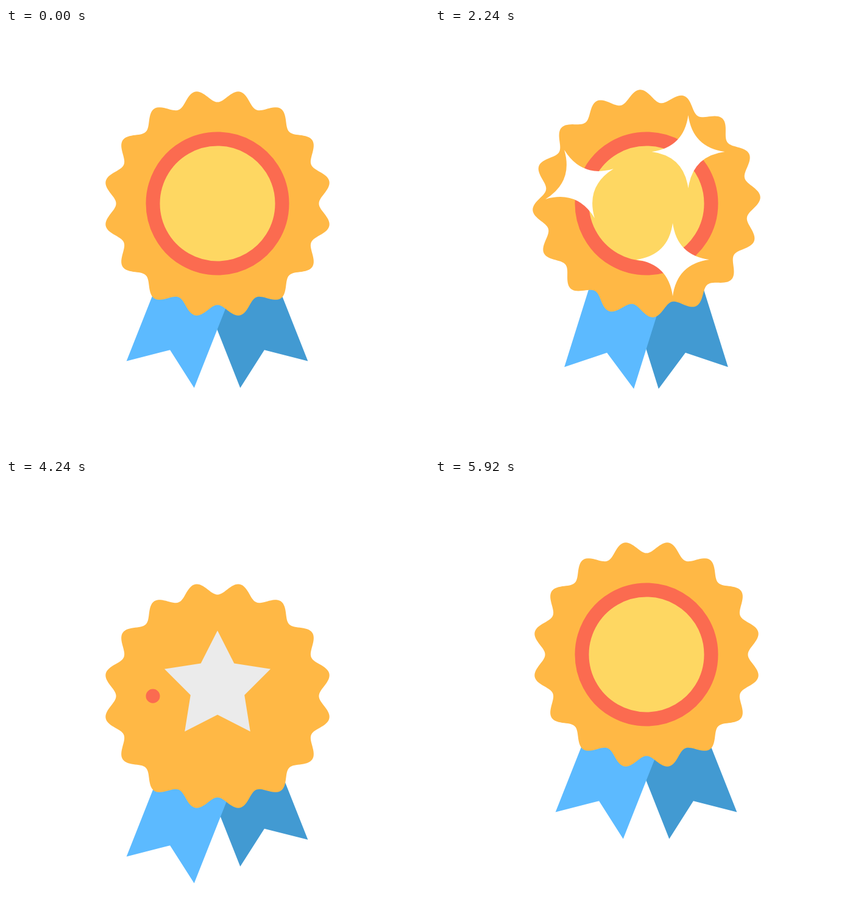
Write an HTML page that moves like this. It is 694 px wide and 694 px high and loops after 6 s.

```html
<!DOCTYPE html>
<html lang="en">
<head>
<meta charset="utf-8">
<title>Award rosette</title>
<style>
  html, body { margin: 0; width: 100%; height: 100%; overflow: hidden; background: #fff; }
  svg { display: block; width: 100%; height: 100%; }
</style>
</head>
<body>
<svg viewBox="0 0 694 694">
  <path id="darkRibbon" fill="#429ad2"/>
  <path id="lightRibbon" fill="#5cbaff"/>
  <path id="badge" fill="#ffb845"/>
  <g id="medal">
    <circle id="disc" r="106" fill="#fed762"/>
    <path id="ring" fill="none" stroke="#fb6b50" stroke-width="23" stroke-linecap="round"/>
  </g>
  <g id="star"><path id="starShape" transform="translate(0 -3)" fill="#ebebeb"/></g>
  <g id="sparkles" fill="#fff"></g>
</svg>
<script>
const LOOP = 6000, STEP = 80;
const CX = 347, CY = 288, RING_R = 106, TILT = 21.6, LOBES = 16;
const el = id => document.getElementById(id);

const easeCubic = p => p < 0.5 ? 4 * p ** 3 : 1 - 4 * (1 - p) ** 3;
const easeSine = p => (1 - Math.cos(Math.PI * p)) / 2;

// Progress from 0 to 1 between two times.
function ramp(t, start, end, ease = easeCubic) {
  return ease(Math.min(1, Math.max(0, (t - start) / (end - start))));
}

// Eased value through [time, value] keys.
function track(t, keys) {
  let value = keys[0][1];
  for (let i = 1; i < keys.length; i++) {
    value += (keys[i][1] - keys[i - 1][1]) * ramp(t, keys[i - 1][0], keys[i][0]);
  }
  return value;
}

// Closed outline from a polar function; angle 0 points up, clockwise.
function polar(count, radius) {
  const points = Array.from({ length: count }, (_, i) => {
    const a = i / count * 2 * Math.PI, r = radius(a, i);
    return (r * Math.sin(a)).toFixed(2) + ' ' + (-r * Math.cos(a)).toFixed(2);
  });
  return 'M' + points.join('L') + 'Z';
}

// Clockwise part of the ring, measured in turns from its leftmost point.
function ringArc(from, to) {
  const start = Math.min(from, to - 0.0001);
  const end = Math.min(to, start + 0.9999);
  const at = turn => {
    const a = turn * 2 * Math.PI;
    return `${-RING_R * Math.cos(a)} ${-RING_R * Math.sin(a)}`;
  };
  const large = end - start > 0.5 ? 1 : 0;
  return `M${at(start)}A${RING_R} ${RING_R} 0 ${large} 1 ${at(end)}`;
}

function place(node, x, y, angle = 0, scale = 1) {
  node.setAttribute('transform', `translate(${x} ${y}) rotate(${angle}) scale(${scale})`);
}

const jump = (t, delay = 0) =>
  track(t - delay, [[3960, 0], [4390, 82], [4400, 82], [4994, -56], [5100, -56], [5640, 0]]);

const swell = (t, amount) =>
  1 + amount * (ramp(t, 573, 1233) - ramp(t, 1273, 1693));

const ribbonPath = 'M-59.7 0H59.7V231.7L0 188.5L-59.7 231.7Z';
el('lightRibbon').setAttribute('d', ribbonPath);
el('darkRibbon').setAttribute('d', ribbonPath);
el('badge').setAttribute('d', polar(LOBES * 30, a => 176.7 - 10.3 * Math.cos(LOBES * a)));
el('starShape').setAttribute('d', polar(10, (a, i) => i % 2 ? 46.5 : 91.5));

const sparkles = [
  { x: 390, y: 380, size: 60, angle: 0, show: 1488, hide: 2518 },
  { x: 415.5, y: 203, size: 60, angle: 0, show: 1578, hide: 2628 },
  { x: 237, y: 256, size: 62, angle: -24, show: 1900, hide: 2730 }
];
for (const s of sparkles) {
  s.node = document.createElementNS('http://www.w3.org/2000/svg', 'path');
  s.node.setAttribute('d', 'M0-1Q.12-.12 1 0Q.12 .12 0 1Q-.12 .12-1 0Q-.12-.12 0-1Z');
  el('sparkles').append(s.node);
}

function draw(t) {
  const swing = track(t, [[2060, 0], [2700, 47.1], [2760, 47.1], [3420, 0]]);
  const lightY = track(t, [[100, 0], [655, -40], [1310, 43], [1870, 0]]) + jump(t, -20);
  const darkY = track(t, [[265, 0], [830, -40], [1460, 43], [2020, 0]]) + jump(t, 57);
  place(el('lightRibbon'), 338.5, 353 + lightY, TILT - swing);
  place(el('darkRibbon'), 354.5, 353 + darkY, swing - TILT);

  const lift = CY + jump(t);
  place(el('badge'), CX, lift, 180 * ramp(t, 1658, 3253, easeSine), swell(t, 0.3));
  place(el('medal'), CX, lift, 0, swell(t - 190, 0.3));

  const discScale = 1 - ramp(t, 2800, 3400) + ramp(t, 5150, 5700);
  place(el('disc'), 0, 0, 0, discScale);
  el('ring').setAttribute('d', t < 4659
    ? ringArc(ramp(t, 2421, 3221), 1)
    : ringArc(0, Math.max(0.0001, ramp(t, 4659, 5639))));

  const starScale = ramp(t, 3123, 3723) - ramp(t, 5150, 5550);
  place(el('star'), CX, 286 + jump(t, 32), 360 * (1 - starScale), starScale);

  for (const s of sparkles) {
    const grow = ramp(t, s.show, s.show + 400) - ramp(t, s.hide, s.hide + 400);
    place(s.node, s.x, s.y, s.angle, s.size * grow);
  }
}

const began = performance.now();
function frame() {
  const t = (performance.now() - began) % LOOP;
  draw(Math.floor(t / STEP) * STEP);
  requestAnimationFrame(frame);
}
frame();
</script>
</body>
</html>
```
